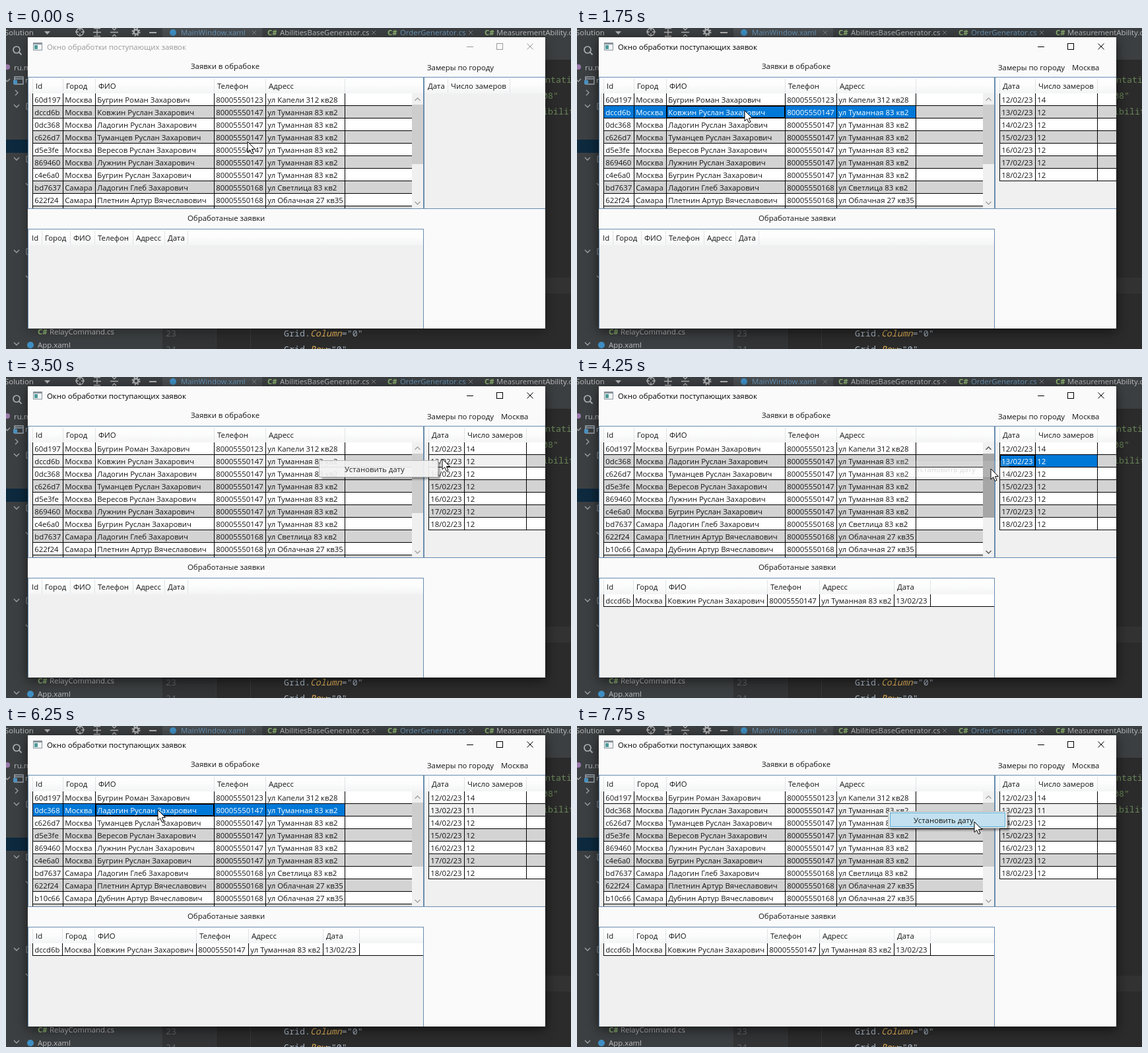
Animation, 856 px wide and 486 px high, one loop 8000 ms. Source, as an HTML page:

```html
<!DOCTYPE html>
<html lang="ru">
<head>
<meta charset="utf-8">
<title>Окно обработки заявок</title>
<style>
  html, body { margin: 0; width: 100%; height: 100%; overflow: hidden; background: #2b2b2b; }
  svg { display: block; width: 856px; height: 486px; }
  text { font-family: "Open Sans", "Noto Sans", sans-serif; font-size: 11.4px; white-space: pre; }
  .code { font-family: "Noto Sans Mono", "DejaVu Sans Mono", monospace; font-size: 13.3px; }
  rect { shape-rendering: crispEdges; }
</style>
</head>
<body>
<svg id="stage" viewBox="0 0 856 486" xmlns="http://www.w3.org/2000/svg">
  <defs>
    <filter id="shadow" x="-10%" y="-10%" width="120%" height="120%">
      <feGaussianBlur stdDeviation="9"/>
    </filter>
    <filter id="soft" x="-10%" y="-50%" width="120%" height="200%">
      <feGaussianBlur stdDeviation="1.5"/>
    </filter>
    <linearGradient id="head" x2="0" y2="1">
      <stop offset="0" stop-color="#fff"/><stop offset=".5" stop-color="#fcfcfc"/>
      <stop offset="1" stop-color="#f3f4f5"/>
    </linearGradient>
    <clipPath id="clip1"><rect x="33" y="74" width="600" height="199"/></clipPath>
  </defs>
  <g id="ide"></g>
  <g id="win"></g>
  <path id="cursor" d="M0 0V16L3.7 12.6L6.3 18.6L9 17.4L6.4 11.6H11.5Z" fill="#fff" stroke="#000"/>
</svg>
<script>
const LOOP = 8000;
const $ = id => document.getElementById(id);

const box = (x, y, w, h, fill, extra = '') =>
  `<rect x="${x}" y="${y}" width="${w}" height="${h}" fill="${fill}" ${extra}/>`;
const text = (x, y, s, fill = '#161616', extra = '') =>
  `<text x="${x}" y="${y}" fill="${fill}" ${extra}>${s}</text>`;
const line = (d, stroke, width = 1) =>
  `<path d="${d}" fill="none" stroke="${stroke}" stroke-width="${width}"/>`;
const dot = (x, y, r, fill) => `<circle cx="${x}" cy="${y}" r="${r}" fill="${fill}"/>`;
const frame = (x, y, w, h, stroke) =>
  box(x + .5, y + .5, w - 1, h - 1, 'none', `stroke="${stroke}"`);

// ---- Data ----
const phoneA = '80005550123', phoneB = '80005550147', phoneC = '80005550168';
const home = 'ул Туманная 83 кв2';
const moscow = (id, surname) => [id, 'Москва', surname + ' Руслан Захарович', phoneB, home];
const samara = (id, name, street) => [id, 'Самара', name, phoneC, street];
const orders = [
  ['60d197', 'Москва', 'Бугрин Роман Захарович', phoneA, 'ул Капели 312 кв28'],
  moscow('dccd6b', 'Ковжин'),
  moscow('0dc368', 'Ладогин'),
  moscow('c626d7', 'Туманцев'),
  moscow('d5e3fe', 'Вересов'),
  moscow('869460', 'Лужнин'),
  moscow('c4e6a0', 'Бугрин'),
  samara('bd7637', 'Ладогин Глеб Захарович', 'ул Светлица 83 кв2'),
  samara('622f24', 'Плетнин Артур Вячеславович', 'ул Облачная 27 кв35'),
  samara('b10c66', 'Дубнин Артур Вячеславович', 'ул Облачная 27 кв35'),
  ['', '', '', '', '']
];
const orderHeads = ['Id', 'Город', 'ФИО', 'Телефон', 'Адресс'];
const doneHeads = [...orderHeads, 'Дата'];
const dayHeads = ['Дата', 'Число замеров'];

// ---- Pointer stops: time, x, y ----
const stops = [
  [0, 366, 172], [250, 291, 134], [500, 254, 125], [2250, 403, 125], [2500, 631, 126],
  [2750, 661, 124], [4000, 627, 139], [4500, 490, 152], [4750, 269, 154],
  [5000, 184, 138], [5250, 175, 132], [6250, 230, 127], [6500, 580, 130],
  [6750, 658, 127], [7750, 602, 145]
];
const within = (t, a, b) => t >= a && t < b;

// ---- Editor behind the window ----
function chevron(x, y, right) {
  return line(right ? `M${x - 2} ${y - 4}l4 4l-4 4` : `M${x - 4} ${y - 2}l4 4l4 -4`, '#a0a3a5', 1.3);
}

function csFile(x, y, name, nameX, fill) {
  return text(x, y, 'C#', '#8fb573', 'font-weight="700"') + text(nameX, y, name, fill);
}

function drawIde() {
  const pale = '#bbbdbf', blue = '#6897bb', green = '#6a8759';
  const code = (x, y, s, fill) => text(x, y, s, fill, 'class="code"');
  const attr = (y, name) => code(421, y,
    `Grid.<tspan fill="#e5b45a" font-style="italic">${name}</tspan>="0"`, '#a9b7c6');
  const close = x => line(`M${x - 3} 4l6 6m0 -6l-6 6`, '#7d8083');
  const arrows = (x, inward) => line(
    `M${x - 6} 6.5h12` + (inward
      ? `M${x - 3} 0l3 3l3 -3M${x - 3} 13l3 -3l3 3`
      : `M${x - 5} .5h10M${x - 5} 12.5h10M${x} 2v9`), '#afb1b3', 1.4);

  return box(0, 0, 856, 486, '#2b2b2b') + box(0, 0, 237, 486, '#3c3f41')
    + box(237, 0, 619, 48, '#3c3f41') + box(237, 0, 151, 14, '#4a4e51')
    + box(237, 48, 81, 438, '#313335') + box(318, 455, 1, 31, '#393939') + box(370, 455, 1, 31, '#393939')
    + box(817, 378, 39, 24, '#323232') + box(0, 169, 33, 20, '#0d293e')
    // toolbar
    + text(-2, 11, 'Solution', pale)
    + '<path d="M58 5h9l-4.500 5z" fill="#afb1b3"/>'
    + line('M117.500 6a5.500 5.500 0 1 1 -11 0a5.500 5.500 0 1 1 11 0M112 -1v5m0 4v5M105 6h5m4 0h5', '#afb1b3', 1.4)
    + arrows(138) + arrows(164, true)
    + '<circle cx="197" cy="6" r="3.500" fill="none" stroke="#afb1b3" stroke-width="2.500"/>'
    + '<circle cx="197" cy="6" r="5.500" fill="none" stroke="#afb1b3" stroke-width="2" stroke-dasharray="2.200 2.120"/>'
    + box(217, 6, 11, 2, '#afb1b3')
    // tabs
    + dot(253, 7, 5, '#3f8fc4') + text(265, 11, 'MainWindow.xaml', blue) + close(376)
    + csFile(396, 11, 'AbilitiesBaseGenerator.cs', 415, pale) + close(557)
    + csFile(578, 11, 'OrderGenerator.cs', 597, blue) + close(704)
    + csFile(725, 11, 'MeasurementAbility.cs', 743, pale)
    // project tree
    + '<circle cx="16" cy="33" r="5" fill="none" stroke="#afb1b3" stroke-width="1.700"/>'
    + line('M19.500 36.500l4 4', '#afb1b3', 1.8)
    + dot(2, 59, 4, '#9876aa') + text(12, 64, 'ru.m', pale)
    + chevron(2, 79) + line('M13 74h13v11h-13zM13 77h13', '#9aa7b0', 1.5) + box(11, 79, 6, 6, '#4a91bf')
    + text(29, 83, 'r', pale) + chevron(16, 98, true)
    + [118, 198, 338].map(y => chevron(16, y) + line(`M34 ${y - 4}h-3v9h3`, '#9aa7b0')).join('')
    + chevron(34, 237) + chevron(34, 377)
    + csFile(48, 464, 'RelayCommand.cs', 66, pale)
    + chevron(16, 478) + dot(37, 480, 5, '#3f8fc4') + text(48, 484, 'App.xaml', pale)
    // code
    + code(809, 83, 'entation"', green) + code(813, 107, '08"', green) + code(813, 131, 'ibility', green)
    + code(242, 467, '23', '#606366') + code(242, 491, '24', '#606366')
    + attr(467, 'Column') + attr(491, 'Row');
}

// ---- Data grid ----
function grid({ x, y, right, bottom, lines, heads, rows, end = right, sel = -1, active, focus }) {
  const top = y + 25, last = lines[lines.length - 1];
  let s = box(x, y, right - x, bottom - y, '#f0f0f0') + box(x, y + 1, right - x, 24, 'url(#head)');
  lines.forEach((lx, i) => {
    if (i || rows.length) s += box(lx, y + 3, 1, 21, '#e0e3e6');
    if (heads[i]) s += text(lx + 5, y + 18, heads[i]);
  });
  rows.forEach((row, r) => {
    const ry = top + r * 19, chosen = r === sel;
    s += box(lines[0], ry, end - lines[0], 18, r % 2 ? '#d3d3d3' : '#fff');
    if (chosen) s += box(lines[0], ry, last - lines[0], 18, active ? '#0078d7' : '#f0f0f0');
    row.forEach((v, i) => s += text(lines[i] + 3.2, ry + 14, v, chosen && active ? '#fff' : '#161616'));
    s += box(lines[0], ry + 18, end - lines[0], 1, '#000');
    lines.forEach(lx => s += box(lx, ry, 1, 19, '#000'));
    if (chosen && active) s += frame(lines[focus] + 1, ry, lines[focus + 1] - lines[focus] - 1, 18, '#000');
  });
  return s;
}

function scrollbar(thumb, hover) {
  const ink = hover ? '#505050' : '#a0a0a0';
  return box(615, 99, 17, 174, '#f0f0f0') + box(615, 116, 17, thumb, hover ? '#a6a6a6' : '#cdcdcd')
    + line('M619.500 110l4 -4l4 4M619.500 263l4 4l4 -4', ink, 1.3);
}

function menu(x, y, opacity, hover) {
  return `<g opacity="${opacity}">` + box(x + 4, y + 4, 180, 25, '#000', 'opacity=".4" filter="url(#soft)"')
    + box(x, y, 181, 26, '#f2f2f2') + frame(x, y, 181, 26, '#b4b4b4')
    + (hover ? box(x + 3, y + 2, 175, 22, '#c2e0ef') + frame(x + 3, y + 2, 175, 22, '#58b0dc') : '')
    + text(x + 39, y + 18, 'Установить дату') + '</g>';
}

function drawWindow(t) {
  const awake = t >= 1000, loaded = t >= 1750, moved = t >= 4250;
  const ink = awake ? '#000' : '#999';
  const picked = within(t, 1000, 4250) || t >= 5250;
  const leftActive = within(t, 1000, 3000) || within(t, 5250, 7000);
  const rightActive = within(t, 3000, 3500) || within(t, 4250, 5250) || within(t, 7000, 7500);
  const overBar = within(t, 2500, 2750) || within(t, 4250, 4500);
  const count = i => i === 0 ? 14 : i === 1 && t >= 5500 ? 11 : 12;
  const days = Array.from({ length: 7 }, (_, i) => [`${12 + i}/02/23`, count(i)]);
  const queue = orders.filter((_, i) => !(moved && i === 1)).slice(0, 10);

  let s = box(33, 18, 784, 441, '#000', `filter="url(#shadow)" opacity="${awake ? .6 : .35}"`)
    + box(33, 14, 784, 441, '#fafafa')
    + box(41, 22, 14, 12, '#8a949c') + box(42, 25, 12, 8, '#f4f6f7') + box(43, 26, 5, 6, '#4d9b9a')
    + text(62, 33, 'Окно обработки поступающих заявок', ink)
    + box(698, 28, 10, 1, ink) + frame(743, 23, 10, 10, ink)
    + line('M789.500 23.500l9 9m0 -9l-9 9', ink)
    + text(280, 62, 'Заявки в обрабоке') + text(638, 64, 'Замеры по городу')
    + text(275, 292, 'Обработаные заявки');
  if (loaded) s += text(750, 64, 'Москва');

  s += '<g clip-path="url(#clip1)">' + grid({
    x: 33, y: 74, right: 632, bottom: 273, end: 615,
    lines: [40, 86, 135, 315, 393, 513], heads: orderHeads, rows: queue,
    sel: picked ? 1 : -1, active: leftActive, focus: 2
  }) + scrollbar(moved ? 97 : 90, overBar) + '</g>' + frame(33, 74, 600, 200, '#688caf');

  s += grid({
    x: 633, y: 74, right: 817, bottom: 273,
    lines: loaded ? [640, 694, 788] : [634, 669, 763], heads: dayHeads, rows: loaded ? days : [],
    sel: t >= 3000 ? 1 : -1, active: rightActive, focus: 0
  }) + box(633, 74, 184, 1, '#688caf') + box(633, 273, 184, 1, '#688caf') + box(633, 74, 1, 200, '#688caf');

  s += grid({
    x: 33, y: 304, right: 632, bottom: 455,
    lines: moved ? [40, 85, 134, 288, 367, 480, 535] : [34, 54, 97, 134, 192, 240, 275],
    heads: doneHeads, rows: moved ? [[...orders[1], '13/02/23']] : []
  }) + box(33, 304, 600, 1, '#688caf') + box(33, 304, 1, 151, '#688caf') + box(632, 304, 1, 151, '#688caf');

  if (within(t, 3500, 4500)) s += menu(474, 126, t < 3750 ? .92 : t < 4250 ? 1 : .15);
  if (t >= 7500) s += menu(471, 129, t < 7750 ? .92 : 1, t >= 7750);
  return s;
}

// Everything changes on a quarter-second beat.
let shown = -1;
function render(ms) {
  const t = Math.floor(ms % LOOP / 250) * 250;
  if (t === shown) return;
  shown = t;
  $('win').innerHTML = drawWindow(t);
  const [, x, y] = stops.filter(p => p[0] <= t).pop();
  $('cursor').setAttribute('transform', `translate(${x} ${y})`);
}

$('ide').innerHTML = drawIde();
const start = performance.now();
function tick() {
  render(performance.now() - start);
  requestAnimationFrame(tick);
}
tick();
</script>
</body>
</html>
```
